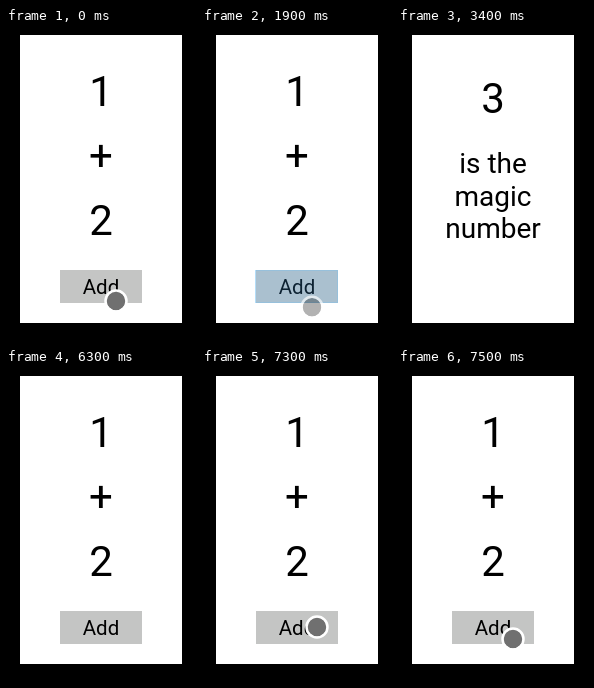
An HTML page for the animation above (8000 ms loop, 190 by 313 pixels).

```html
<!DOCTYPE html>
<html>
<head>
<meta charset="utf-8">
<style>
html, body { margin: 0; width: 100%; height: 100%; overflow: hidden; background: #000; }
svg { display: block; width: 190px; height: 313px; }
text { font-family: Roboto, sans-serif; text-anchor: middle; }
.big { font-size: 42px; }
.mid { font-size: 28px; }
.label { font-size: 20.5px; }
</style>
</head>
<body>
<svg viewBox="0 0 190 313">
  <rect x="14" y="7" width="162" height="288" fill="#fff"/>
  <g id="sum">
    <g class="big">
      <text x="95" y="77.5">1</text>
      <text x="95" y="142">+</text>
      <text x="95" y="207">2</text>
    </g>
    <rect x="54" y="242" width="82" height="33" fill="#c4c5c4"/>
    <text class="label" x="95" y="266">Add</text>
  </g>
  <g id="result">
    <text class="big" x="95" y="85">3</text>
    <g class="mid">
      <text x="95" y="145">is the</text>
      <text x="95" y="178">magic</text>
      <text x="95" y="210">number</text>
    </g>
  </g>
  <rect id="flash" x="53.5" y="242.5" width="82" height="32" fill="#42aafa" fill-opacity=".4" stroke="#6cbcf2"/>
  <g id="touch">
    <circle id="dot" r="9.5"/>
    <circle r="10.5" fill="none" stroke="#fff" stroke-width="2.5"/>
  </g>
</svg>
<script>
const [sum, result, flash, touch, dot] =
  ["sum", "result", "flash", "touch", "dot"].map(id => document.getElementById(id));
const clamp = v => Math.max(0, Math.min(1, v));
const show = (el, on) => el.style.display = on ? "" : "none";

// Touch position and opacity; null while the finger is away
function touchAt(t) {
  if (t < 2300) {
    const p = clamp((t - 1500) / 700);
    return [110, 273 + 19 * p * p, 1 - clamp((t - 1700) / 600)];
  }
  if (t < 6900) return null;
  if (t < 7000) return [106, 303, 1];
  if (t < 7300) return [114, 254, 1];
  return [115, 258 + 12 * clamp((t - 7300) / 200), 1];
}

function draw(now) {
  const t = Math.floor(now % 8000 / 100) * 100;
  const done = t >= 3400 && t < 6300;
  show(sum, !done);
  show(result, done);

  const pressed = t >= 1500 && t < 2300;
  show(flash, pressed);
  flash.setAttribute("opacity", 1 - clamp((t - 1700) / 400));

  const p = touchAt(t);
  show(touch, p);
  if (p) {
    touch.setAttribute("transform", `translate(${p[0]} ${p[1]})`);
    touch.setAttribute("opacity", p[2]);
    dot.setAttribute("fill", pressed ? "rgba(0,0,0,.45)" : "#707070");
  }
}

let start;
function tick(now) {
  start ??= now;
  draw(now - start);
  requestAnimationFrame(tick);
}
draw(0);
requestAnimationFrame(tick);
</script>
</body>
</html>
```
